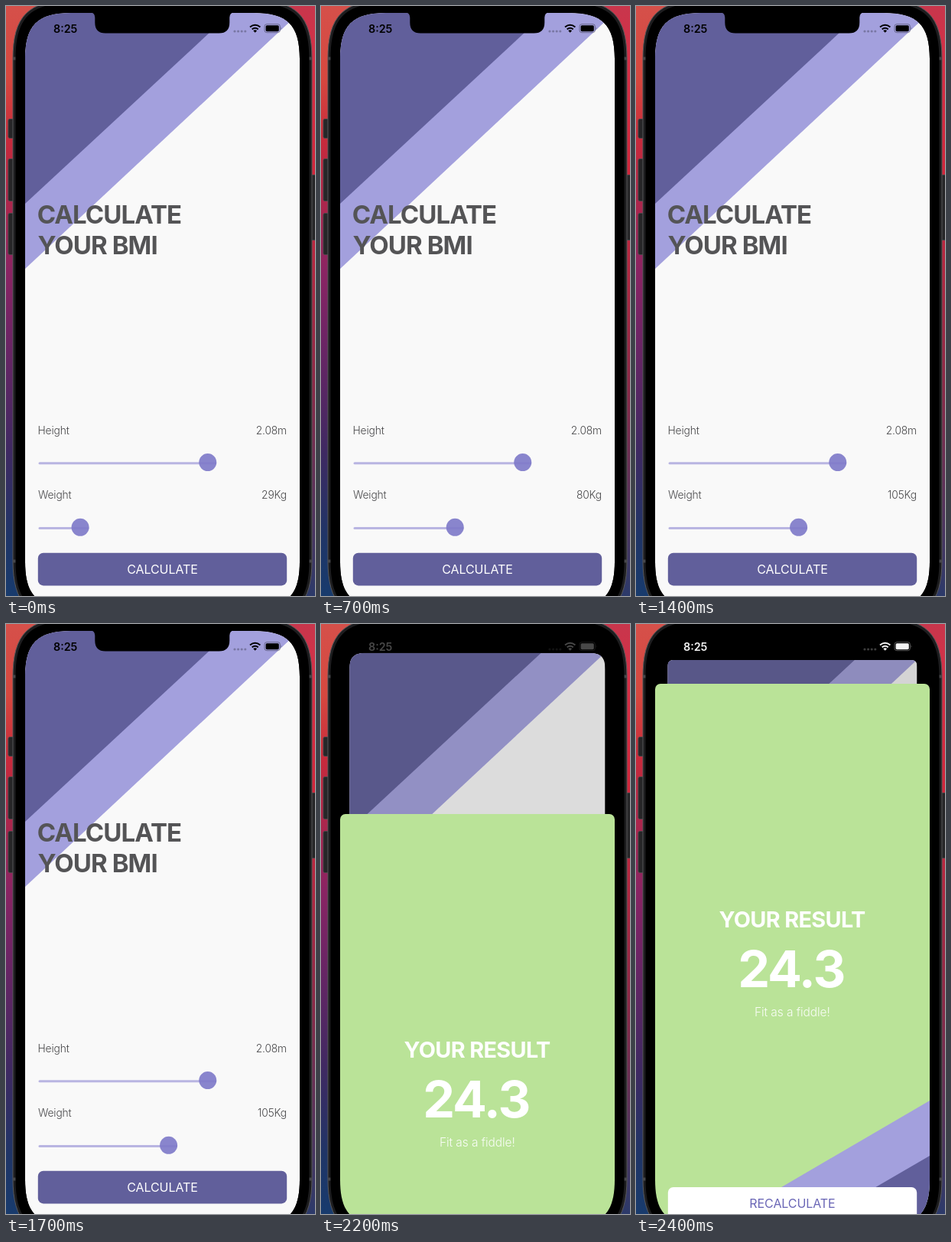
Write an HTML page that moves like this. It is 404 by 770 pixels and loops after 2.5 s.

```html
<!DOCTYPE html>
<html lang="en">
<head>
<meta charset="utf-8">
<title>BMI calculator</title>
<style>
  html, body { margin: 0; width: 100%; height: 100%; overflow: hidden; background: #000; }
  svg { display: block; width: 404px; height: 770px; }
  text { font-family: Inter, "Liberation Sans", sans-serif; }
  .title { font-size: 33px; font-weight: 700; letter-spacing: -.028em; fill: #545456; }
  .label { font-size: 13.8px; font-weight: 300; letter-spacing: -.01em; fill: #48484a; }
  .action { font-size: 16px; letter-spacing: -.005em; text-anchor: middle; }
  .end { text-anchor: end; }
  .mid { text-anchor: middle; fill: #fff; }
  .result { font-size: 28.8px; font-weight: 700; letter-spacing: -.022em; }
  .score { font-size: 66.5px; font-weight: 700; letter-spacing: -.03em; }
  .note { font-size: 15.5px; font-weight: 300; letter-spacing: -.005em; opacity: .92; }
  .time { font-size: 14.3px; font-weight: 600; }
  .track { stroke: #b9b5e2; stroke-width: 3; stroke-linecap: round; }
  .thumb { fill: #7f7bca; fill-opacity: .91; }
  .side { fill: #262628; stroke: #4b4548; stroke-width: 1; }
</style>
</head>
<body>
<svg viewBox="0 0 404 770">
  <defs>
    <linearGradient id="wall" x2="0" y2="1">
      <stop offset="0" stop-color="#d5504a"/>
      <stop offset=".12" stop-color="#d6483f"/>
      <stop offset=".23" stop-color="#c72a3c"/>
      <stop offset=".35" stop-color="#a8264f"/>
      <stop offset=".45" stop-color="#8a2463"/>
      <stop offset=".55" stop-color="#702465"/>
      <stop offset=".75" stop-color="#402962"/>
      <stop offset=".9" stop-color="#1f3567"/>
      <stop offset="1" stop-color="#183b6d"/>
    </linearGradient>
    <linearGradient id="wallRight" x2="0" y2="1">
      <stop offset="0" stop-color="#c8364c"/>
      <stop offset=".1" stop-color="#d62f46"/>
      <stop offset=".28" stop-color="#d0273c"/>
      <stop offset=".65" stop-color="#8a2a48"/>
      <stop offset="1" stop-color="#2c3a6a"/>
    </linearGradient>
    <clipPath id="screenClip"><path id="screenShape"/></clipPath>
    <clipPath id="cardClip"><path id="cardShape"/></clipPath>
  </defs>

  <rect width="210" height="770" fill="url(#wall)"/>
  <rect x="210" width="194" height="770" fill="url(#wallRight)"/>

  <!-- phone body -->
  <g class="side">
    <rect x="3" y="147.5" width="9" height="25" rx="2"/>
    <rect x="3" y="199.5" width="9" height="55" rx="2"/>
    <rect x="3" y="270.5" width="9" height="54" rx="2"/>
    <rect x="396" y="220.5" width="10" height="85" rx="2"/>
  </g>
  <path id="rim" fill="#1d1d1f" stroke="#59595b"/>
  <path d="M9 68.5h4M396 68.5h4M9 724.5h4M396 724.5h4" stroke="#47474a" stroke-width="4"/>
  <path id="bezel"/>

  <g clip-path="url(#screenClip)">
    <rect x="25" y="9" width="359" height="777"/>

    <g id="card">
      <g clip-path="url(#cardClip)">
        <rect x="25" y="9" width="359" height="777" fill="#f9f9f9"/>
        <path d="M25 9H383.5L25 343Z" fill="#a3a0dd"/>
        <path d="M25 9H294L25 258Z" fill="#615f9b"/>
        <text class="title" x="40.7" y="284.3">CALCULATE</text>
        <text class="title" x="41.5" y="324">YOUR BMI</text>

        <text class="label" x="41.5" y="558.5">Height</text>
        <text class="label end" x="367" y="558.5">2.08m</text>
        <line id="heightTrack" class="track" x1="44" y1="596.7" y2="596.7"/>
        <circle id="heightThumb" class="thumb" cy="595.6" r="11.5"/>

        <text class="label" x="42" y="643">Weight</text>
        <text class="label end" id="weight" x="367" y="643"></text>
        <line id="weightTrack" class="track" x1="44" y1="681.4" y2="681.4"/>
        <circle id="weightThumb" class="thumb" cy="680.3" r="11.5"/>

        <rect x="41.8" y="713.8" width="325.4" height="42.6" rx="7" fill="#615f9b"/>
        <text class="action" id="calculate" x="204.5" y="741" fill="#fff">CALCULATE</text>
        <rect id="shade" x="25" y="9" width="359" height="777" fill="#303030"/>
      </g>
    </g>

    <!-- result sheet, placed by its top edge -->
    <g id="sheet">
      <rect x="25" width="359" height="790" rx="7" fill="#bae398"/>
      <path d="M384 544V790H-38Z" fill="#a3a0dd"/>
      <path d="M384 616V790H84Z" fill="#615f9b"/>
      <text class="mid result" x="204.1" y="317.8">YOUR RESULT</text>
      <text class="mid score" x="202.8" y="395.5">24.3</text>
      <text class="mid note" x="204.3" y="434">Fit as a fiddle!</text>
      <rect x="41.8" y="657" width="325.4" height="42.6" rx="7" fill="#fff"/>
      <text class="action" x="204.5" y="684.3" fill="#6a66b6">RECALCULATE</text>
    </g>
  </g>

  <path d="M110 8Q116.3 9 116.3 15V21.5Q116.3 35.5 130 35.5H278.5Q292.3 35.5 292.3 21.5V15Q292.3 9 298.5 8Z"/>

  <!-- status bar -->
  <g id="status">
    <text class="time" x="62" y="34.5">8:25</text>
    <g opacity=".25">
      <circle cx="299" cy="33" r="1.6"/><circle cx="303.6" cy="33" r="1.6"/>
      <circle cx="308.2" cy="33" r="1.6"/><circle cx="312.8" cy="33" r="1.6"/>
    </g>
    <path d="M325.7 34.8L323.3 32.2Q325.7 30.3 328.1 32.2Z"/>
    <g fill="none" stroke="currentColor" stroke-width="2">
      <path d="M321.7 30.4Q325.7 27.2 329.7 30.4"/>
      <path d="M319 27.5Q325.7 22.1 332.4 27.5"/>
    </g>
    <rect x="338" y="23.7" width="20.4" height="11" rx="3" fill="none" stroke="currentColor" opacity=".35"/>
    <rect x="339.6" y="25.2" width="17.2" height="8" rx="1.6"/>
    <path d="M359.6 27.4Q361.4 29.2 359.6 31Z" opacity=".4"/>
  </g>
</svg>

<script>
  const LOOP = 2500, STEP = 100;
  const OPEN = 21; // step at which the sheet starts to rise
  const SHEET_TOPS = [768, 248, 118, 78];
  const STATUS_COLORS = ["#000", "#484848", "#b4b4b4", "#f4f4f4"];
  const $ = id => document.getElementById(id);
  const set = (id, attrs) => {
    for (const name in attrs) $(id).setAttribute(name, attrs[name]);
  };

  // Rectangle whose corners ease into the sides, as on the phone.
  function smoothRect(x, y, w, h, r) {
    const e = 1.3 * r, k = .348 * r, d = e - k;
    const across = w - 2 * e, down = h - 2 * e;
    return `M${x + e} ${y}h${across}c${d} 0 ${e} ${k} ${e} ${e}` +
      `v${down}c0 ${d} ${-k} ${e} ${-e} ${e}` +
      `h${-across}c${-d} 0 ${-e} ${-k} ${-e} ${-e}` +
      `v${-down}c0 ${-d} ${k} ${-e} ${e} ${-e}z`;
  }

  function slide(name, part) {
    const x = 53 + 304 * part;
    set(name + "Track", { x2: x + 10 });
    set(name + "Thumb", { cx: x });
  }

  function draw(step) {
    const kg = step < 5 ? 29 + 7 * step : Math.min(105, 64 + 8.2 * (step - 5));
    slide("weight", kg / 200);
    $("weight").textContent = Math.round(kg) + "Kg";
    set("calculate", { opacity: step >= OPEN - 1 ? .27 : 1 });

    const phase = Math.max(0, step - OPEN);
    const top = step < OPEN ? 800 : SHEET_TOPS[phase];
    const p = Math.max(0, (768 - top) / 690);
    const scale = 1 - 32.8 * p / 359;
    set("sheet", { transform: `translate(0 ${top})` });
    set("card", {
      transform: `translate(${25 + 16.4 * p} ${9 + 38 * p}) scale(${scale}) translate(-25 -9)`
    });
    set("cardShape", { d: smoothRect(25, 9, 359, 776, (46 - 39 * p) / scale) });
    set("shade", { opacity: .185 * p });
    set("status", { fill: STATUS_COLORS[phase], color: STATUS_COLORS[phase] });
  }

  set("rim", { d: smoothRect(9, -7.5, 391, 808, 59) });
  set("bezel", { d: smoothRect(12.5, -4, 384, 801, 56) });
  set("screenShape", { d: smoothRect(25, 9, 359, 776, 46) });
  slide("height", 2.08 / 3);

  const start = performance.now();
  function tick() {
    draw(Math.floor((performance.now() - start) % LOOP / STEP));
    requestAnimationFrame(tick);
  }
  tick();
</script>
</body>
</html>
```
